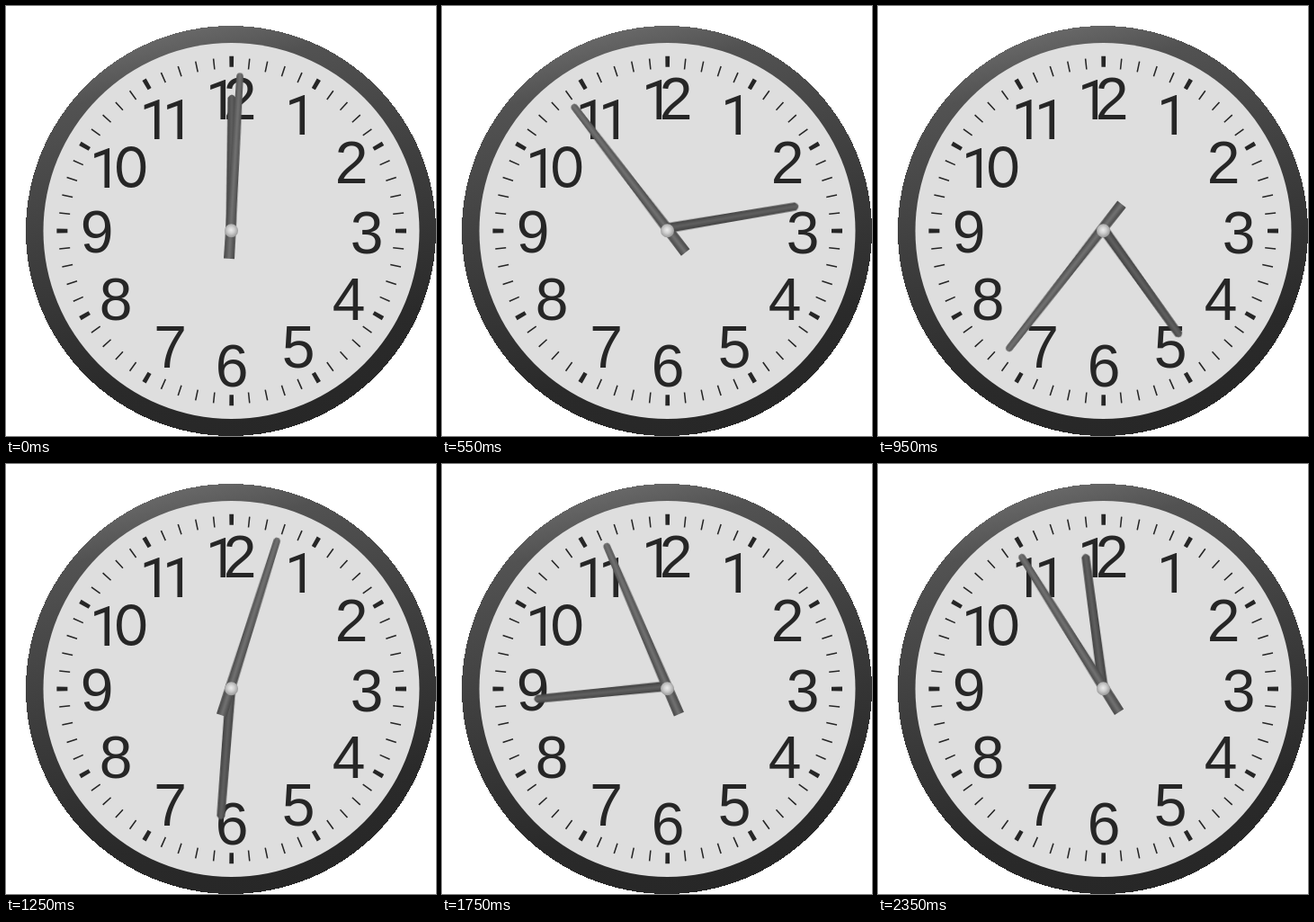
These frames come from a looping animation (478x478 px, 2.4 s). An HTML page:

```html
<!DOCTYPE html>
<html lang="en">
<head>
<meta charset="utf-8">
<title>Wall clock</title>
<style>
  html, body { margin: 0; width: 100%; height: 100%; overflow: hidden; background: #fff; }
  svg { display: block; width: 478px; height: 478px; }

  .soft { filter: blur(.6px); }
  .numerals { font: 66px "Liberation Sans", Arial, sans-serif; fill: #262626; text-anchor: middle; }
  .one { font: 62px Roboto, sans-serif; }
  .zero { font: 63px Inter, sans-serif; }
  .ticks { fill: none; stroke: #262626; stroke-width: 12; }

  /* the hands turn slightly above the cap */
  .hand {
    transform-origin: 250px 247px;
    animation: turn 2400ms -1ms infinite;
  }
  .hour { --start: .4deg; --step: 8deg; }
  .minute { --start: 3.4deg; --step: 31.92deg; }

  /* 45 poses on a 50 ms beat; poses 0, 20 and 40 last two beats */
  @keyframes turn {
    0% { transform: rotate(var(--start)); animation-timing-function: step-end; }
    2.08333% { transform: rotate(var(--start)); animation-timing-function: steps(20); }
    43.75% { transform: rotate(calc(var(--start) + 20 * var(--step))); animation-timing-function: step-end; }
    45.83333% { transform: rotate(calc(var(--start) + 20 * var(--step))); animation-timing-function: steps(20); }
    87.5% { transform: rotate(calc(var(--start) + 40 * var(--step))); animation-timing-function: step-end; }
    89.58333% { transform: rotate(calc(var(--start) + 40 * var(--step))); animation-timing-function: steps(5); }
    100% { transform: rotate(calc(var(--start) + 45 * var(--step))); }
  }
</style>
</head>
<body>
<svg viewBox="0 0 478 478">
  <defs>
    <linearGradient id="rim" gradientUnits="userSpaceOnUse" x1="185" y1="25" x2="300" y2="476">
      <stop offset="0" stop-color="#6a6a6a"/>
      <stop offset=".12" stop-color="#525252"/>
      <stop offset=".5" stop-color="#3b3b3b"/>
      <stop offset=".8" stop-color="#2a2a2a"/>
      <stop offset="1" stop-color="#272727"/>
    </linearGradient>
    <linearGradient id="hourFill" gradientUnits="userSpaceOnUse" x1="245" y1="0" x2="255" y2="0">
      <stop offset="0" stop-color="#454545"/>
      <stop offset=".5" stop-color="#606060"/>
      <stop offset="1" stop-color="#424242"/>
    </linearGradient>
    <linearGradient id="minuteFill" gradientUnits="userSpaceOnUse" x1="245" y1="0" x2="255" y2="0">
      <stop offset="0" stop-color="#4c4c4c"/>
      <stop offset=".5" stop-color="#727272"/>
      <stop offset="1" stop-color="#4c4c4c"/>
    </linearGradient>
    <radialGradient id="cap" cx=".48" cy=".45" r=".55">
      <stop offset="0" stop-color="#ececec"/>
      <stop offset=".45" stop-color="#cfcfcf"/>
      <stop offset="1" stop-color="#999"/>
    </radialGradient>
  </defs>

  <circle cx="250" cy="250" r="228" fill="url(#rim)" shape-rendering="crispEdges"/>

  <g class="soft">
    <circle cx="250.5" cy="250" r="209" fill="#dedede"/>

    <g class="ticks">
      <circle cx="250.7" cy="250" r="186.5" pathLength="600"
        stroke-dasharray=".8 9.2 .8 9.2 .8 9.2 .8 19.2" stroke-dashoffset="-9.6"/>
      <circle cx="250.7" cy="250" r="188.3" pathLength="120"
        stroke-dasharray=".48 9.52" stroke-dashoffset=".24"/>
    </g>

    <g class="numerals">
      <text class="one" x="239.5" y="126">1</text><text x="260" y="126">2</text>
      <text class="one" x="327.5" y="143">1</text>
      <text x="384" y="196.5">2</text>
      <text x="401" y="274.5">3</text>
      <text x="381" y="349">4</text>
      <text x="325" y="402">5</text>
      <text x="251" y="423">6</text>
      <text x="182.5" y="402">7</text>
      <text x="122" y="349">8</text>
      <text x="101" y="273.5">9</text>
      <text class="one" x="110.5" y="202">1</text><text class="zero" x="139" y="202">0</text>
      <text class="one" x="166" y="148">1</text><text class="one" x="191.500" y="148">1</text>
    </g>
  </g>

  <g class="soft">
    <path class="hand hour" fill="url(#hourFill)"
      d="M244.500 249 L245.500 102 Q250 95 254.500 102 L255.500 249 Z"/>
    <path class="hand minute" fill="url(#minuteFill)"
      d="M244 281 L246.200 78 Q246.500 74 250 74 Q253.500 74 253.800 78 L256 281 Z"/>
    <circle cx="250.500" cy="249.700" r="7.500" fill="url(#cap)"/>
  </g>
</svg>
</body>
</html>
```
